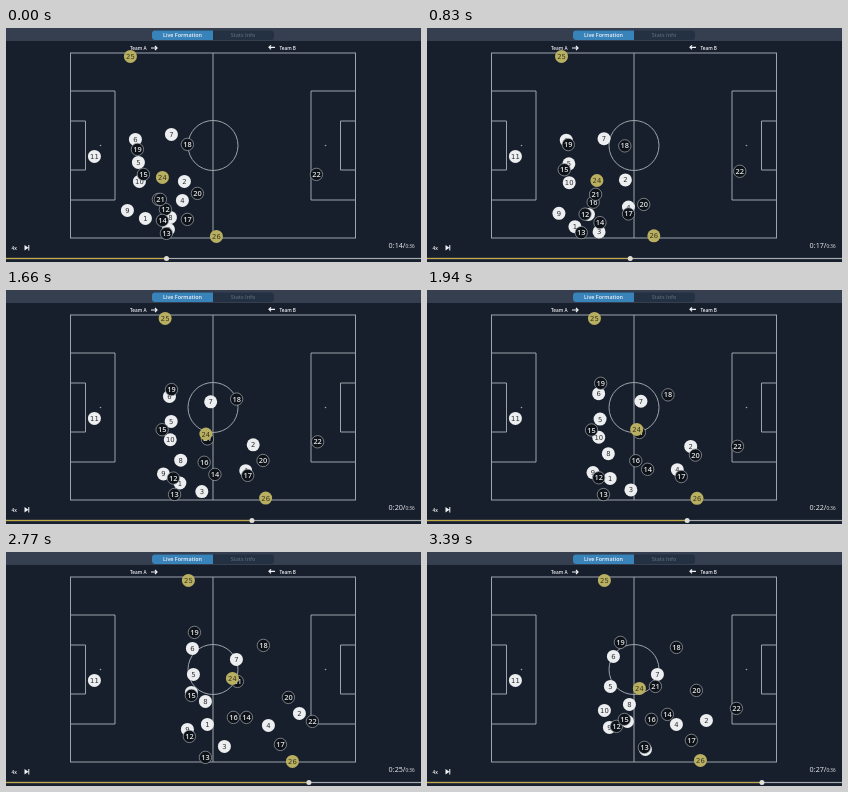
Animation, 415 px wide and 234 px high, one loop 3460 ms. Source, as an HTML page:

```html
<!DOCTYPE html>
<html lang="en">
<head>
<meta charset="utf-8">
<title>Live formation</title>
<style>
  html, body { margin: 0; width: 100%; height: 100%; overflow: hidden; background: #171e2c; }
  svg { display: block; width: 100vw; height: 100vh; }
  text { font-family: "Open Sans", "Noto Sans", sans-serif; fill: #f0f1f3; }
  .pitch { fill: none; stroke: #9ca5ab; stroke-width: 1; }
  .num { font-family: "DejaVu Sans", sans-serif; font-size: 6.8px; text-anchor: middle; }
  .home circle { fill: #eceeef; }
  .home text { fill: #2b2e34; }
  .away circle { fill: #0d1118; stroke: #a3a8ad; stroke-width: .7; }
  .away text { font: 600 7.4px "Open Sans", sans-serif; fill: #e4e6e8; }
  .ref circle { fill: #b9af60; }
  .ref text { fill: #38361f; }
  .arrow { fill: none; stroke: #f0f1f3; stroke-width: 1.2; }
</style>
</head>
<body>
<svg viewBox="0 0 415 234" preserveAspectRatio="none">
  <rect width="415" height="234" fill="#171e2c"/>
  <rect width="415" height="13" fill="#363f50"/>
  <rect x="146" y="2.5" width="122" height="9.5" rx="3" fill="#233142"/>
  <path d="M207 2.5H149a3 3 0 0 0-3 3v3.5a3 3 0 0 0 3 3h58z" fill="#3983bb"/>
  <g font-size="5.4" font-weight="600" text-anchor="middle">
    <text x="176.5" y="9.2">Live Formation</text>
    <text x="237" y="9.2" style="fill:#5b6774">Stats Info</text>
  </g>
  <g font-size="4.7" font-weight="600" text-anchor="middle">
    <text x="132.3" y="21.8">Team A</text>
    <text x="281.7" y="21.8">Team B</text>
  </g>
  <path class="arrow" d="M145 20h6m-2-2l2 2l-2 2M269 19.3h-6m2-2l-2 2l2 2"/>

  <g class="pitch">
    <rect x="64.5" y="25" width="285" height="185"/>
    <path d="M207 25V210M64.5 63H109V172H64.5M64.5 93H79.5V142H64.5M349.5 63H305V172H349.5M349.5 93H334.5V142H349.5"/>
    <circle cx="207" cy="117.5" r="25"/>
  </g>
  <g fill="#9ca5ab">
    <circle cx="94.5" cy="117.5" r=".8"/>
    <circle cx="319.5" cy="117.5" r=".8"/>
  </g>

  <g id="players"></g>

  <text x="5.5" y="221.5" font-size="4.8" font-weight="600">4x</text>
  <path d="M18.5 217l4 2.7l-4 2.7zM22.3 217h1v5.4h-1z" fill="#f0f1f3"/>
  <text x="399.5" y="220" font-size="7.2" text-anchor="end" id="clock"></text>
  <text x="399.5" y="220" font-size="4.6">0:36</text>
  <rect y="229.9" width="415" height="1.2" fill="#a9acad"/>
  <rect y="229.9" height="1.2" fill="#bfaa45" id="played"/>
  <circle cy="230.5" r="2.5" fill="#dfdfd8" id="knob"/>
</svg>
<script>
const LOOP = 3460, STEPS = 50, STEP = LOOP / STEPS;
const TURN = 40 / STEPS;          // part of the loop when the attack turns back
const SWING = [-3, 5];            // how far a run usually bows off its straight line
const NS = "http://www.w3.org/2000/svg";
const byId = id => document.getElementById(id);
const layer = byId("players");
const players = [];

function add(parent, tag, attrs) {
  const el = document.createElementNS(NS, tag);
  for (const k in attrs) el.setAttribute(k, attrs[k]);
  return parent.appendChild(el);
}

// A player runs from start to far, then falls back to end
function player(n, start, far = start, end = far, swing = SWING) {
  const team = n < 12 ? "home" : n < 23 ? "away" : "ref";
  const g = add(layer, "g", { class: team });
  add(g, "circle", { r: team === "away" ? 6.2 : 6.5 });
  add(g, "text", { class: "num", y: 2.5 }).textContent = n;
  players.push({ g, start, far, end, swing });
}

player(1, [139, 190], [201, 172], [200, 169], [-6, 15]);
player(2, [178, 153], [293, 161], [279, 168], [-6, -4]);
player(3, [162, 201], [218, 194], [218, 197]);
player(4, [176, 172], [262, 173], [249, 172], [8, 8]);
player(5, [132, 134], [187, 122], [183, 134]);
player(6, [129, 111], [186, 96], [186, 104]);
player(7, [165, 106], [230, 107], [230, 122]);
player(8, [164, 189], [199, 149], [202, 152], [-13, 7]);
player(9, [121, 182], [181, 177], [182, 175]);
player(10, [133, 153], [185, 140], [177, 158]);
player(11, [88, 128], undefined, undefined, [0, 0]);
player(12, [159, 181], [183, 184], [189, 174], [-8, 5]);
player(13, [160, 205], [199, 205], [217, 195], [-18, -1]);
player(14, [156, 192], [240, 165], [240, 162], [-2, 10]);
player(15, [137, 146], [185, 143], [197, 167], [-13, -5]);
player(16, [152, 171], [227, 165], [224, 167]);
player(17, [181, 191], [274, 192], [264, 188], [0, -7]);
player(18, [181, 116], [257, 93], [249, 95], [0, 8]);
player(19, [131, 121], [188, 80], [193, 90]);
player(20, [191, 165], [282, 145], [269, 138], [7, 19]);
player(21, [154, 171], [231, 129], [228, 134]);
player(22, [310, 146], [306, 169], [309, 156], [4, -10]);
player(24, [156, 149], [226, 126], [212, 136], [-2, 10]);
player(25, [124, 28], [182, 28], [177, 28], [-3, 0]);
player(26, [210, 208], [286, 209], [273, 208], [0, -1]);

const ease = u => u * u * (3 - 2 * u);
const clamp = u => Math.min(Math.max(u, 0), 1);

function place(p, axis, run, back) {
  const a = p.start[axis], b = p.far[axis], c = p.end[axis];
  return 0.4 + a + (b - a) * ease(run) + (c - b) * ease(back)
    + p.swing[axis] * Math.sin(Math.PI * run);
}

function draw(ms) {
  const k = Math.min(Math.floor(ms / STEP + 0.05), STEPS - 1);
  const run = clamp(k / STEPS / TURN);
  const back = clamp((k / STEPS - TURN) / (1 - TURN - 1 / STEPS));
  for (const p of players) {
    const x = place(p, 0, run, back), y = place(p, 1, run, back);
    p.g.setAttribute("transform", `translate(${x.toFixed(2)} ${y.toFixed(2)})`);
  }
  // Playback runs at four times normal speed
  byId("clock").textContent = "0:" + Math.floor(14.26 + k * STEP * 4 / 1000) + "/";
  const x = 160.5 + 3.56 * k;
  byId("played").setAttribute("width", x);
  byId("knob").setAttribute("cx", x);
}

const start = performance.now();
function tick() {
  draw((performance.now() - start) % LOOP);
  requestAnimationFrame(tick);
}
tick();
</script>
</body>
</html>
```
